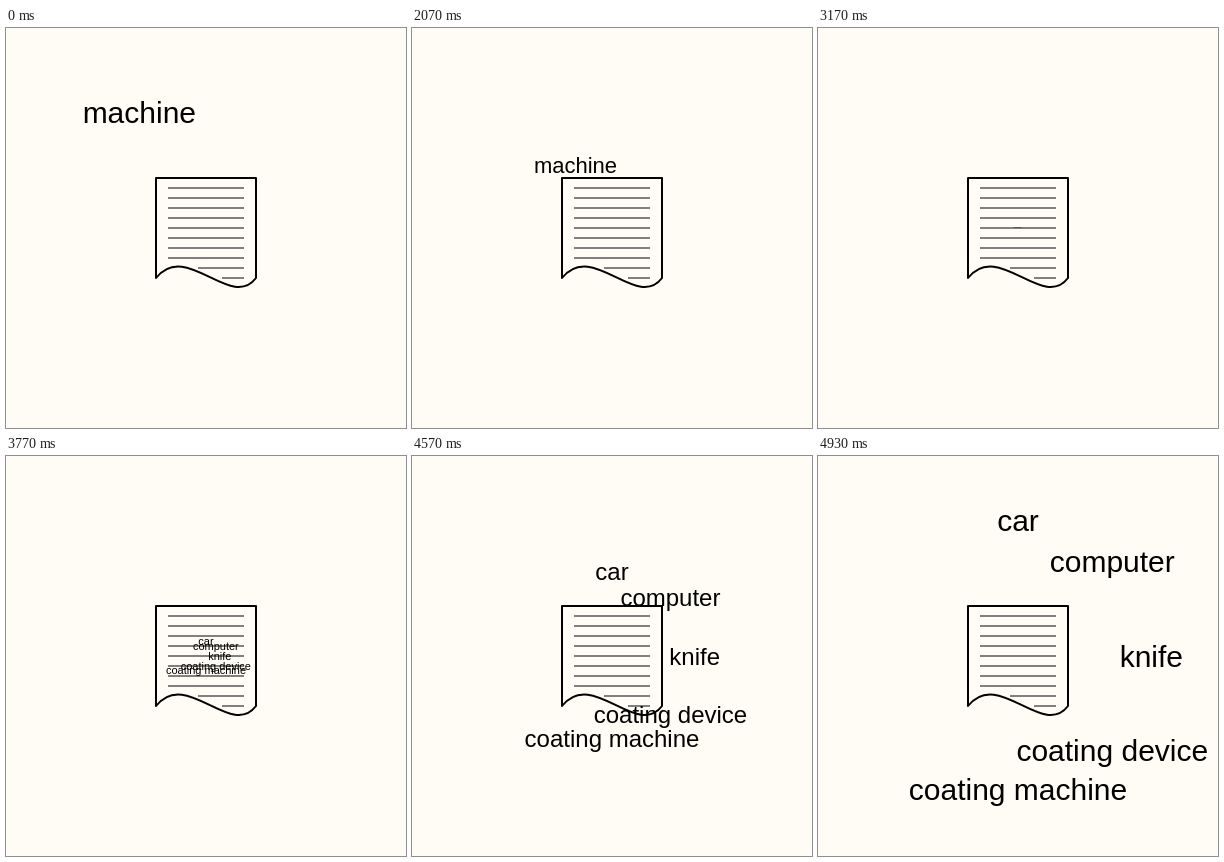
Animation of 400 by 400 pixels, one loop 6.66 s. Source, as an HTML page:

```html
<!DOCTYPE html>
<html lang="en">
<head>
<meta charset="utf-8">
<title>Words through a page</title>
<style>
  html, body { margin: 0; width: 100%; height: 100%; overflow: hidden; background: #fffcf5; }
  svg { display: block; width: 100%; height: 100%; }
  text { font-family: "Liberation Sans", Arial, sans-serif; text-anchor: middle; fill: #000; }
  .page { fill: none; stroke: #000; stroke-width: 2; stroke-linejoin: round; }
  .rule { stroke: #808080; stroke-width: 2; }
</style>
</head>
<body>
<svg id="stage" viewBox="0 0 400 400">
  <path class="rule" d="M162 160H238M162 170H238M162 180H238M162 190H238M162 200H238M162 210H238M162 220H238M162 230H238M192 240H238M216 250H238"/>
  <path class="page" d="M150 250V150H250V250C225 283 180 212 150 250Z"/>
</svg>
<script>
  const LOOP = 6660, STEP = 100 / 3;
  const CENTER = 200, RADIUS = 400 / 3, FULL = 30;
  const IN_START = 49, OUT_START = 98, SPAN = 50;
  const stage = document.getElementById('stage');

  // rise: half the ink height above the baseline, in em
  function makeWord(label, degrees, rise = 0.358) {
    const el = document.createElementNS('http://www.w3.org/2000/svg', 'text');
    el.textContent = label;
    stage.append(el);
    const a = degrees * Math.PI / 180;
    return { el, rise, dx: RADIUS * Math.cos(a), dy: RADIUS * Math.sin(a) };
  }

  const input = makeWord('machine', 240);
  const outputs = [
    makeWord('car', -90, 0.267),
    makeWord('computer', -45, 0.35),
    makeWord('knife', 0),
    makeWord('coating device', 45),
    makeWord('coating machine', 90)
  ];

  function place(word, reach, size, visible) {
    const { el, dx, dy, rise } = word;
    el.setAttribute('visibility', visible ? 'visible' : 'hidden');
    el.setAttribute('font-size', size);
    el.setAttribute('x', CENTER + dx * reach);
    el.setAttribute('y', CENTER + dy * reach + rise * size);
  }

  const clamp = v => Math.min(1, Math.max(0, v));

  function draw() {
    const tick = Math.floor(performance.now() % LOOP / STEP + 0.11);

    const u = 1 - clamp((tick - IN_START) / SPAN);
    place(input, u * u, Math.round(FULL * u), tick < OUT_START);

    const t = clamp((tick - OUT_START) / SPAN);
    const reach = t * (2 + 28 * t) / FULL;
    const size = Math.round(2.6 + 27.4 * t);
    for (const word of outputs) place(word, reach, size, t > 0);

    requestAnimationFrame(draw);
  }
  draw();
</script>
</body>
</html>
```
